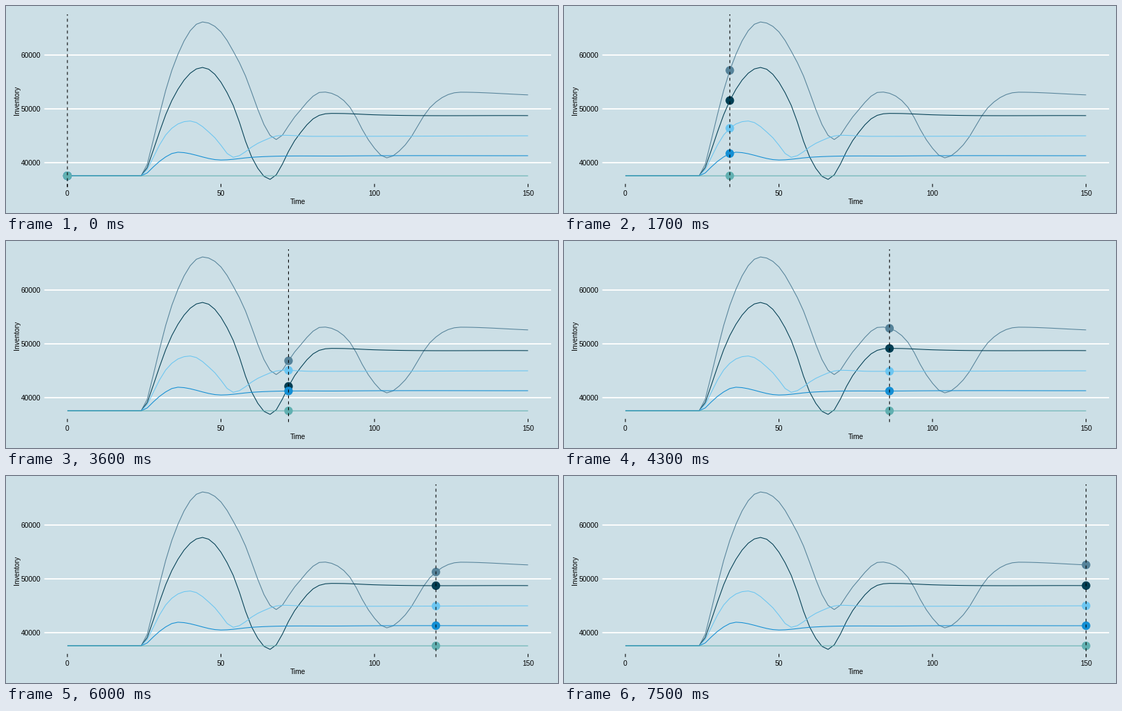
These frames come from a looping animation (800 px wide and 300 px high, 7600 ms). A matplotlib script:

```python
import matplotlib.pyplot as plt
import numpy as np
from matplotlib.animation import FuncAnimation

W, H, DPI = 800, 300, 100
PX = 72 / DPI  # points per pixel
FRAMES, INTERVAL = 76, 100
BG = "#ccdfe6"
LEFT, RIGHT, TOP, BOTTOM = 55.6, 790, 12, 262.4
START = 37.56  # thousands

plt.rcParams["font.family"] = "Liberation Sans"
plt.rcParams["font.size"] = 10.2 * PX

t = np.arange(FRAMES) * 2


def to_x(time):
    """The time span 0 to 150 with a 5 % margin on both sides."""
    return LEFT + (RIGHT - LEFT) * (time / 150 + 0.05) / 1.1


def to_y(thousands):
    return 149.1 - 7.8 * (thousands - 50)


def swing(*knots):
    """Smooth curve through the knots, level at each turning point."""
    kt, kv = np.array(knots).T
    slope = np.gradient(kv, kt)
    step = np.diff(kv)
    slope[1:-1][step[1:] * step[:-1] < 0] = 0

    i = np.clip(np.searchsorted(kt, t, side="right") - 1, 0, len(kt) - 2)
    h = kt[i + 1] - kt[i]
    u = (t - kt[i]) / h
    ease = u * u * (3 - 2 * u)
    curve = (kv[i] + (kv[i + 1] - kv[i]) * ease
             + h * u * (1 - u) * (slope[i] * (1 - u) - slope[i + 1] * u))
    return np.where(t < kt[0], START, curve)


slate = swing((26, 39.7), (34, 57.15), (44, 66.15), (50, 64.3), (56, 58.6),
              (68, 44.3), (74, 48.5), (83, 53.15), (92, 50.3), (98, 44.25),
              (104, 40.9), (110, 43.3), (118, 50.2), (128, 53.1),
              (150, 52.6))
navy = swing((26, 39.1), (34, 51.55), (44, 57.7), (54, 50.65), (60, 41.05),
             (66, 36.9), (74, 44.1), (80, 48.15), (88, 49.15), (100, 48.9),
             (150, 48.75))
sky = swing((26, 38.75), (32, 45.15), (40, 47.75), (48, 44.65), (54, 41),
            (62, 43.6), (70, 45.1), (80, 44.9), (150, 45))
blue = swing((26, 38.1), (30, 40.25), (36, 41.95), (50, 40.5), (60, 41),
             (90, 41.25), (150, 41.3))
teal = np.full(FRAMES, START)

levels = to_y(np.array([slate, navy, sky, blue, teal]))
colors = ["#56839a", "#013e53", "#6cc6f1", "#148fd4", "#61b0b1"]

fig = plt.figure(figsize=(W / DPI, H / DPI), dpi=DPI, facecolor=BG)
ax = fig.add_axes([0, 0, 1, 1])
ax.set_xlim(0, W)
ax.set_ylim(H, 0)
ax.axis("off")


def line(xs, ys, color="black", width=1.07, **kw):
    return ax.plot(xs, ys, color=color, lw=width * PX, snap=False,
                   solid_capstyle="butt", solid_joinstyle="round", **kw)[0]


def label(x, y, text, ha="center", **kw):
    ax.text(x, y, text, ha=ha, va="baseline", **kw)


for thousands in (40, 50, 60):
    y = to_y(thousands)
    line([LEFT, RIGHT], [y, y], "white", 1.87)
    label(50.6, y + 3.7, f"{thousands}000", ha="right")

for time in range(0, 151, 50):
    x = to_x(time)
    line([x, x], [BOTTOM - 4.6, BOTTOM])
    label(x, 275, time)

label((LEFT + RIGHT) / 2, 287, "Time")
label(19.2, (TOP + BOTTOM) / 2, "Inventory", rotation=90,
      rotation_mode="anchor")

for level, color in zip(levels, colors):
    line(to_x(t), level, color, zorder=3)

dots = ax.scatter(np.full(len(colors), to_x(0)), levels[:, 0],
                  s=(12.4 * PX) ** 2, c=colors, linewidths=0, zorder=4,
                  snap=False)
cursor = line([to_x(0)] * 2, [BOTTOM, TOP], zorder=5,
              linestyle=(0, (4, 4)), dash_capstyle="butt")


def update(i):
    x = to_x(t[i])
    dots.set_offsets([(x, y) for y in levels[:, i]])
    cursor.set_xdata([x, x])
    return dots, cursor


anim = FuncAnimation(fig, update, frames=FRAMES, interval=INTERVAL,
                     repeat=True, repeat_delay=0)
plt.show()
```
